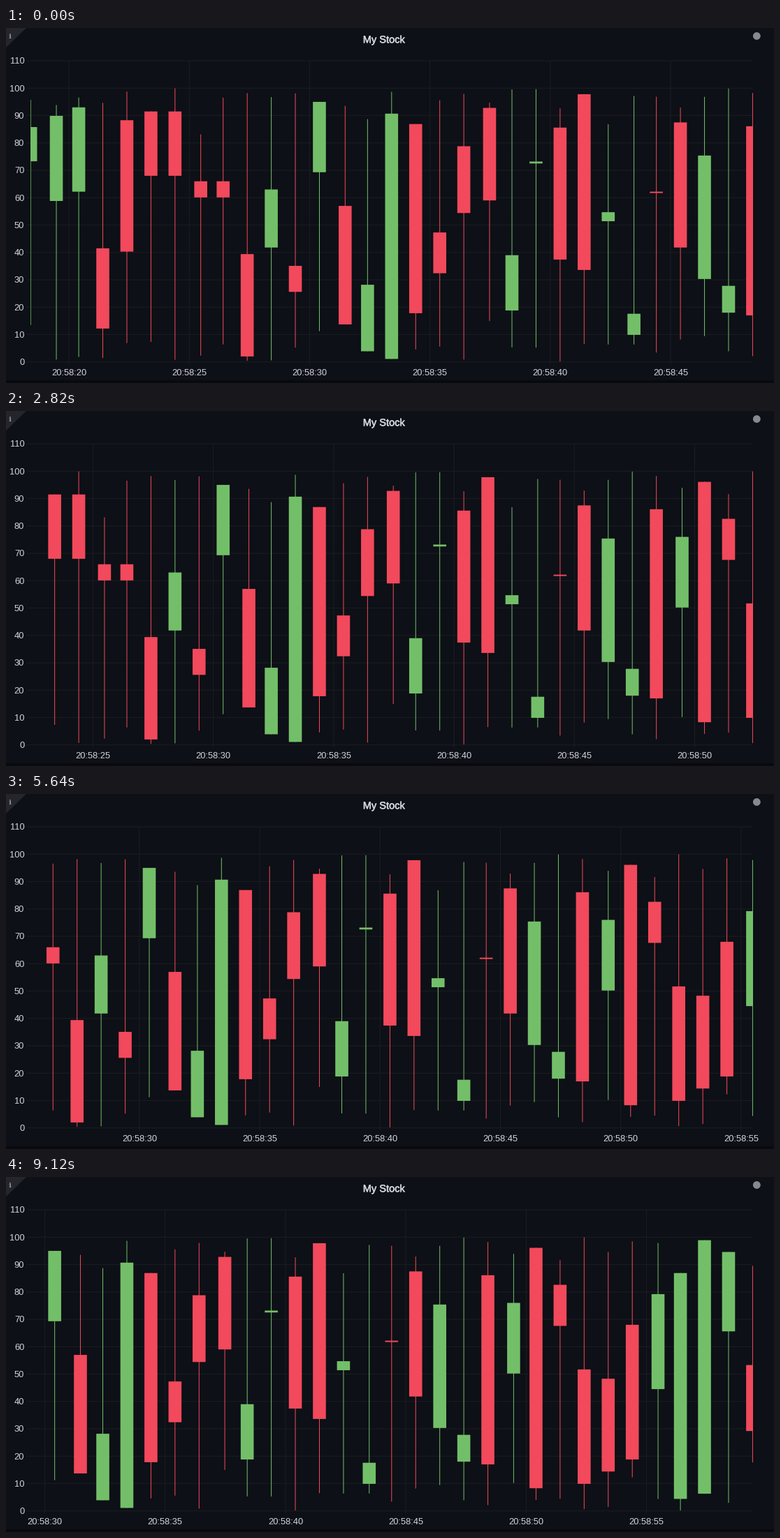
A matplotlib script that plays this animation: 1099x509 px, repeating every 9330 ms.

```python
import numpy as np
import matplotlib.pyplot as plt
from matplotlib import patheffects
from matplotlib.animation import FuncAnimation
from matplotlib.collections import LineCollection, PolyCollection
from matplotlib.patches import Circle, Polygon, Rectangle
from matplotlib.transforms import Bbox, TransformedBbox

W, H, DPI = 1099, 509, 100
STEP, LOOP = 30, 9330
LEFT, RIGHT, TOP, BASE = 35, 1068.5, 47, 478.8
UNIT = 3.925        # pixels per price unit
SECOND = 34.44      # pixels per second
BODY, SHOWN = 18.6, 30
BG, STRIP, GRID, TEXT = "#0d1016", "#080a0e", "#1b1d22", "#d3d4de"
GREEN, RED = "#73bf69", "#f2495c"

# Refresh times (ms); each brings in one new candle
STARTS = [0, 180, 1050, 1920, 2820, 3720, 4620, 5640, 6420, 7290, 8220, 9120]

# Price feed: open and close of each second
FEED = np.array([
    (73.3, 85.8), (58.8, 89.9), (62.2, 93), (41.5, 12.2), (88.3, 40.3), (91.5, 68),
    (91.5, 68), (66, 60.1), (66, 60.1), (39.4, 2), (41.8, 63), (35.1, 25.6),
    (69.3, 95), (57, 13.7), (3.9, 28.2), (1.1, 90.7), (86.9, 17.8), (47.3, 32.4),
    (78.8, 54.4), (92.8, 59), (18.8, 39), (72.5, 73.2), (85.6, 37.4), (97.8, 33.6),
    (51.4, 54.7), (9.9, 17.6), (62.2, 61.7), (87.5, 41.8), (30.3, 75.4), (18, 27.8),
    (86.1, 17), (50.2, 76), (96.1, 8.3), (82.6, 67.6), (51.7, 9.9), (48.3, 14.4),
    (68, 18.8), (44.5, 79.2), (4.4, 86.9), (6.3, 98.9), (65.6, 94.6), (53.3, 29.2)])
OPEN, CLOSE = FEED.T
COUNT = len(FEED)

# Wicks reach close to the ends of the 0..100 range
rng = np.random.default_rng(7)
HIGH = np.maximum(FEED.max(axis=1), 100 - rng.exponential(6, COUNT))
LOW = np.minimum(FEED.min(axis=1), rng.exponential(6, COUNT))

# One candle a second, every sixth a little late
index = np.arange(COUNT)
CENTER = 35.2 + SECOND * index + 2.4 * (index % 6 == 1)


def pt(px):
    return px * 72 / DPI


def price_y(v):
    return BASE - UNIT * v


def bar(x, width, a, b):
    x0, x1, y0, y1 = x - width / 2, x + width / 2, price_y(a), price_y(b)
    return [(x0, y0), (x1, y0), (x1, y1), (x0, y1)]


fig = plt.figure(figsize=((W + .01) / DPI, (H + .01) / DPI), dpi=DPI, facecolor=BG)
ax = fig.add_axes([0, 0, 1, 1])
ax.set(xlim=(0, W), ylim=(H, 0))
ax.axis("off")


def clip(x0, x1):
    return TransformedBbox(Bbox([[x0, 0], [x1, H]]), ax.transData)


def label(x, y, s, size=12.9, **kw):
    kw = {"color": TEXT, "family": "Liberation Sans", "ha": "center", **kw}
    return ax.text(x, y, s, fontsize=pt(size), va="baseline", **kw)


def grid(segments):
    return ax.add_collection(LineCollection(
        segments, colors=GRID, linewidths=pt(1), zorder=1, snap=False))


# Panel chrome
ax.add_patch(Rectangle((0, 505), W, 4, color=STRIP, lw=0))
ax.add_patch(Polygon([(0, 0), (29, 0), (0, 28)], color="#24262c", lw=0))
label(5.2, 15, "i", 10.5, family="DejaVu Serif", weight="bold", color="#8e8f97")
ax.add_patch(Circle((1074.3, 11.5), 5.4, color="#88898e", lw=0))
title = label(541, 21.3, "My Stock", 14.6)
title.set_path_effects([patheffects.withStroke(linewidth=pt(.5), foreground=TEXT)])

# Price axis
levels = range(0, 111, 10)
grid([[(30, price_y(v)), (RIGHT, price_y(v))] for v in levels])
for v in levels:
    label(26.3, price_y(v) + 4.2, str(v), ha="right")

# Moving parts
time_grid = grid([])
candles = ax.add_collection(PolyCollection([], linewidths=0, zorder=2, snap=False))
candles.set_clip_box(clip(LEFT, RIGHT))
times = [label(0, 497.5, "", clip_on=True) for _ in range(7)]
for t in times:
    t.set_clip_box(clip(0, 1076.5))


def draw(i):
    k = np.searchsorted(STARTS, i * STEP, side="right") - 1
    newest = SHOWN + k
    shift = CENTER[newest] - CENTER[SHOWN]

    # The first view still holds one older candle
    oldest = k + 1 if k else 0
    shapes, colors = [], []
    for n in range(oldest, newest + 1):
        x = CENTER[n] - shift
        shapes += [bar(x, 1, HIGH[n], LOW[n]), bar(x, BODY, OPEN[n], CLOSE[n])]
        colors += [GREEN if CLOSE[n] >= OPEN[n] else RED] * 2
    candles.set_verts(shapes)
    candles.set_facecolor(colors)

    ticks = [(90 + SECOND * (s - 20) - shift, s) for s in range(20, 65, 5)]
    ticks = [(x, s) for x, s in ticks if LEFT <= x <= RIGHT]
    time_grid.set_segments([[(x, TOP), (x, BASE + 4)] for x, _ in ticks])
    for t in times:
        t.set_text("")
    for t, (x, s) in zip(times, ticks):
        t.set_x(x)
        t.set_text(f"20:{58 + s // 60}:{s % 60:02d}")
    return [time_grid, candles, *times]


anim = FuncAnimation(fig, draw, frames=LOOP // STEP, interval=STEP,
                     repeat=True, repeat_delay=0, cache_frame_data=False)
plt.show()
```
